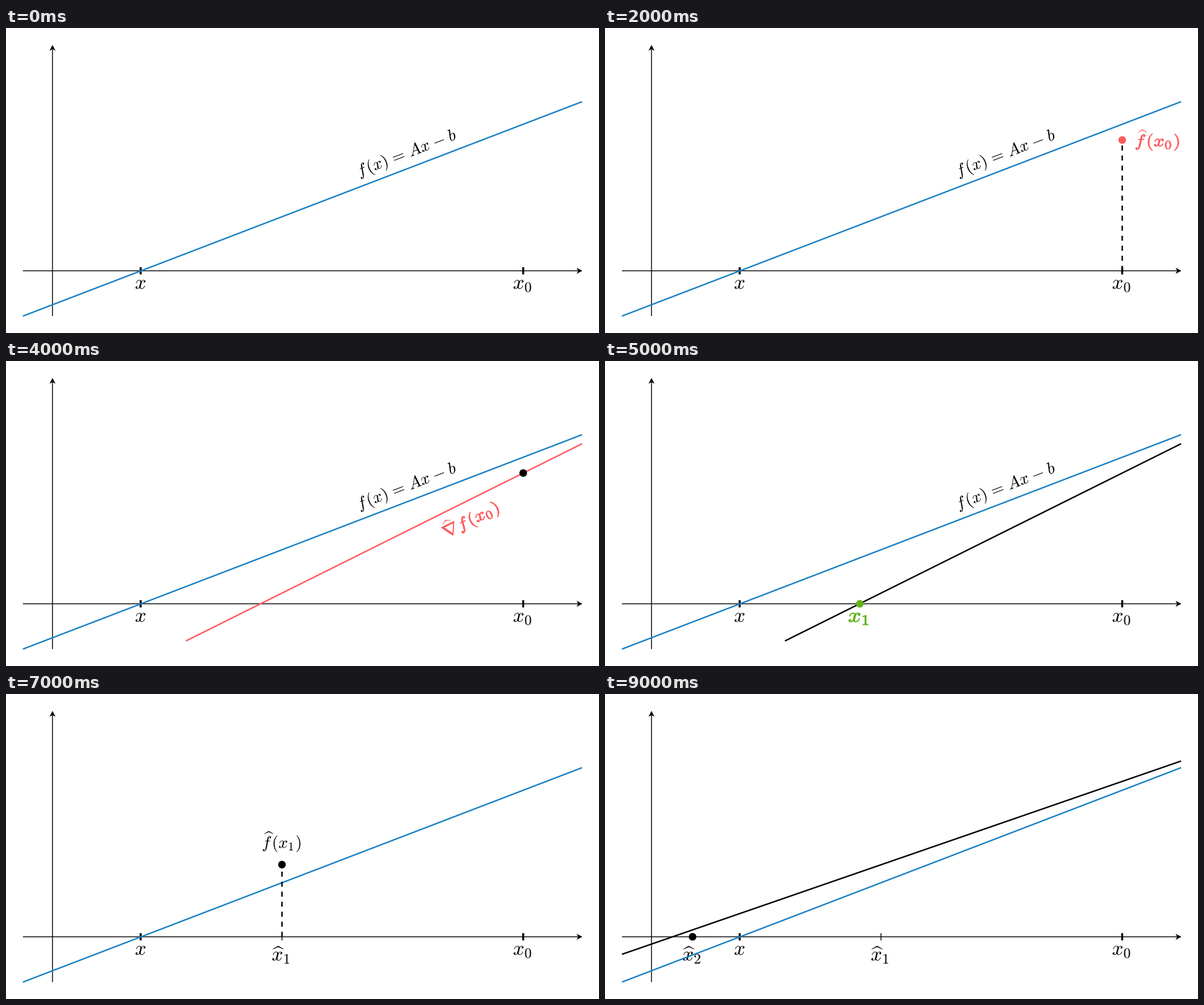
These frames come from a looping animation (982x505 px, 10 s). A matplotlib script:

```python
import math

import matplotlib.pyplot as plt
from matplotlib.animation import FuncAnimation
from matplotlib.patches import Circle, PathPatch, Polygon
from matplotlib.path import Path
from matplotlib.textpath import TextPath
from matplotlib.transforms import Affine2D

W, H, DPI = 982, 505, 64
PX = 72 / DPI                      # points per pixel
STEPS, STEP_MS = 10, 1000
SMALL, LARGE = 27.7, 33.2          # em sizes in pixels
BLACK, BLUE, RED, GREEN = "black", "#1982c4", "#ff595e", "#63b219"

plt.rcParams["mathtext.fontset"] = "cm"
plt.rcParams["path.snap"] = False

fig = plt.figure(figsize=(W / DPI, H / DPI), dpi=DPI, facecolor="white")
ax = fig.add_axes([0, 0, 1, 1])
ax.set_xlim(0, W)
ax.set_ylim(H, 0)
ax.axis("off")

# Advance widths in em; relations include their surrounding space.
ADVANCE = {"f": .598, "(": .389, ")": .389, "x": .572, "=": 1.334,
           "-": 1.222, "A": .75, "b": .429, "∇": .833}
# Accent position above each letter: centre and foot, in em.
ACCENT = {"x": (.32, .562), "f": (.41, .836), "∇": (.417, .814)}
HAT = [(-.278, .02), (0, .18), (.278, .02), (.27, 0), (0, .115), (-.27, 0)]
SUB_SIZE, SUB_DROP, SUB_ADVANCE = .72, .15, .45
BOLD_STRETCH, BOLD_STROKE = 1.15, .03

scene = []


def add(artist, steps):
    ax.add_artist(artist)
    scene.append((artist, set(steps)))


def glyph(char, size):
    path = TextPath((0, 0), "$%s$" % char.replace("∇", r"\nabla"), size=size)
    if char in "=-":
        box = path.get_extents()
        shift = ADVANCE[char] * size / 2 - (box.x0 + box.x1) / 2
        path = path.transformed(Affine2D().translate(shift, 0))
    return path


def label(text, x, y, steps, size=SMALL, color=BLACK, bold=False,
          angle=0, center=False):
    """Set a formula on baseline (x, y); ~ puts a hat on, _ lowers a digit."""
    stretch = BOLD_STRETCH if bold else 1
    glyphs, hats = [], []
    pen, hat, sub = 0, False, False
    for char in text:
        if char == "~":
            hat = True
        elif char == "_":
            sub = True
        else:
            scale = SUB_SIZE if sub else 1
            drop = SUB_DROP * size if sub else 0
            place = Affine2D().scale(stretch, 1).translate(pen, -drop)
            glyphs.append(glyph(char, size * scale).transformed(place))
            if hat:
                cx, foot = ACCENT[char]
                hats.append([(pen + (cx * stretch + u) * size,
                              (foot + v) * size) for u, v in HAT])
            pen += (SUB_ADVANCE if sub else ADVANCE[char]) * size * stretch
            hat = sub = False

    place = Affine2D().translate(-pen / 2 if center else 0, 0)
    place.rotate_deg(angle).scale(1, -1).translate(x, y)
    ink = Path.make_compound_path(*glyphs).transformed(place)
    stroke = BOLD_STROKE * size * PX if bold else 0
    add(PathPatch(ink, facecolor=color, lw=stroke, zorder=3,
                  edgecolor=color if bold else "none"), steps)
    for points in hats:
        add(Polygon(place.transform(points), facecolor=color, lw=0,
                    zorder=3), steps)


def line(x0, y0, x1, y1, steps, color=BLACK, width=2.4, z=5, dash=None):
    style = (0, (dash / width, dash / width)) if dash else "-"
    artist = plt.Line2D([x0, x1], [y0, y1], color=color, lw=width * PX,
                        linestyle=style, solid_capstyle="butt",
                        dash_capstyle="butt", zorder=z)
    add(artist, steps)


def dot(x, y, steps, color=BLACK):
    add(Circle((x, y), 6.3, facecolor=color, lw=0, zorder=7), steps)


def arrow(x, y, angle, steps):
    shape = [(0, 0), (-9.6, 5), (-7, 0), (-9.6, -5)]
    place = Affine2D().rotate_deg(angle).translate(x, y)
    add(Polygon(place.transform(shape), facecolor=BLACK, lw=0, zorder=2),
        steps)


def slope_angle(x0, y0, x1, y1):
    return math.degrees(math.atan2(y0 - y1, x1 - x0))


ALL = range(STEPS)
AXIS = 402
X, X0, X1, X2 = 223, 856.5, 457, 145

# Axes, ticks and the function itself
line(28, AXIS, 948, AXIS, ALL, width=1.4, z=2)
line(77, 477, 77, 34, ALL, width=1.4, z=2)
arrow(954.5, AXIS, 0, ALL)
arrow(77, 28, -90, ALL)
for tick in (X, X0):
    line(tick, AXIS - 6, tick, AXIS + 6, ALL, width=3.3, z=2)
label("x", X, 432, ALL, LARGE, center=True)
label("x_0", X0, 432, ALL, LARGE, center=True)

target_line = (28, 477, 954, 122)
line(*target_line, ALL, BLUE)
label("f(x)=Ax-b", 585, 246, range(7), angle=slope_angle(*target_line))

# Evaluation at the starting point
line(X0, AXIS, X0, 159, [1], dash=8.3)
dot(X0, 159, [1], GREEN)
label("f(x_0)", X0, 132.3, [1], color=GREEN, bold=True, center=True)
line(X0, AXIS, X0, 185.5, [2], dash=8.3)
dot(X0, 185.5, [2], RED)
label("~f(x_0)", 877, 196, [2], color=RED, bold=True)

# Exact and approximate gradients
dot(X0, 185.5, [3, 4])
exact = (105.5, 473.5, 954, 148)
line(*exact, [3], GREEN)
label("∇f(x_0)", 714.5, 279, [3], color=GREEN, bold=True,
      angle=slope_angle(*exact))
approx = (298, 463.5, 954, 137)
line(*approx, [4], RED)
label("~∇f(x_0)", 728, 293.5, [4], color=RED, bold=True,
      angle=slope_angle(*approx))

# First step
line(*approx, [5, 6])
dot(422, AXIS, [5], GREEN)
label("x_1", 422, 432, [5], LARGE, GREEN, bold=True, center=True)
dot(X1, AXIS, [6], RED)
label("~x_1", X1, 441.5, [6], LARGE, RED, bold=True, center=True)

# Second step
later = [7, 8, 9]
line(X1, AXIS - 6, X1, AXIS + 6, later, width=1.4, z=2)
label("~x_1", X1, 441.5, later, LARGE, center=True)
line(X1, AXIS, X1, 282.5, [7], dash=8.3, z=6)
dot(X1, 282.5, [7, 8])
label("~f(x_1)", X1, 255, [7], center=True)
second = (28, 431, 954, 111)
line(*second, [8, 9], z=4)
label("~∇f(x_1)", 313, 315, [8], angle=slope_angle(*second))
dot(X2, AXIS, [9])
label("~x_2", X2, 441.5, [9], LARGE, center=True)


def draw(step):
    for artist, steps in scene:
        artist.set_visible(step in steps)
    return [artist for artist, _ in scene]


anim = FuncAnimation(fig, draw, frames=STEPS, interval=STEP_MS,
                     init_func=lambda: draw(0), repeat=True, repeat_delay=0)
plt.show()
```
